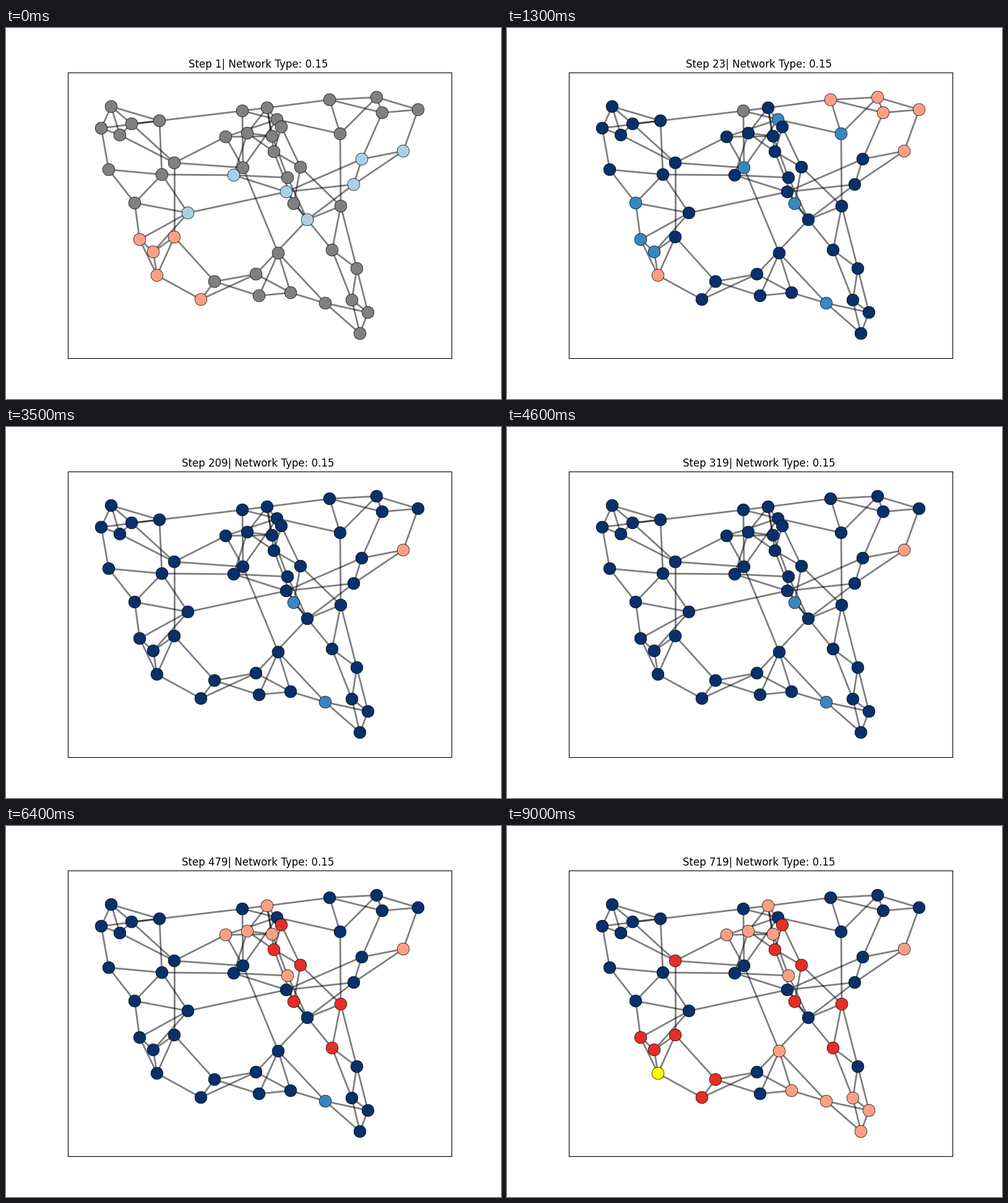
A matplotlib script for the animation above (9100 ms loop, 800 by 600 pixels).

```python
import numpy as np
import matplotlib.pyplot as plt
from matplotlib.animation import FuncAnimation
from matplotlib.collections import LineCollection

# Node positions in pixels, in ring order
NODES = np.array([
    (368, 238), (453, 265), (562, 253), (575, 212), (642, 199), (666, 132),
    (608, 137), (599, 112), (523, 116), (540, 171), (438, 148), (382, 134),
    (383, 226), (248, 150), (272, 218), (203, 155), (184, 173), (170, 127),
    (154, 162), (166, 229), (252, 237), (208, 283), (294, 299), (216, 342),
    (238, 362), (244, 400), (272, 338), (315, 439), (337, 410), (404, 398),
    (409, 433), (460, 428), (440, 364), (516, 445), (572, 494), (585, 460),
    (559, 440), (567, 389), (527, 359), (541, 288), (487, 310), (465, 284),
    (476, 225), (433, 200), (445, 160), (390, 170), (422, 129), (430, 175),
    (355, 176), (455, 242)])
N = len(NODES)

# Small-world graph: each node links to its next two, some links are rewired
REWIRED = {(12, 13): 32, (13, 14): 20, (17, 19): 13, (18, 20): 13,
           (26, 27): 14, (29, 30): 40, (39, 41): 42, (40, 42): 2,
           (46, 48): 11, (48, 49): 14, (48, 0): 12, (49, 1): 40,
           (0, 2): 20, (3, 5): 6, (8, 10): 46, (9, 11): 39}
CUT = {(44, 45), (4, 6), (32, 34)}
EXTRA = [(22, 1), (45, 0), (48, 10), (43, 46), (1, 40)]

ring = [(u, (u + k) % N) for u in range(N) for k in (1, 2)]
edges = EXTRA + [(u, REWIRED.get((u, v), v))
                 for u, v in ring if (u, v) not in CUT]

BLUES = [plt.cm.Blues(k / 3) for k in (1, 2, 3)]
SALMON, RED = plt.cm.Reds(1 / 3), plt.cm.Reds(2 / 3)

BLUE_SEEDS = [*range(5), 22, 40]
RED_SEEDS = range(23, 28)
REBELS = range(4, 9)
SLOW, SLOWEST, STUCK = {9, 10, 12, 21, 23, 24}, {11, 25}, {33, 41}

# Later outbreaks: step, colour, nodes
OUTBREAKS = [(350, SALMON, range(45, 50)),
             (450, RED, {38, 39, *range(41, 45)}),
             (500, RED, {14, *range(23, 29)}),
             (600, SALMON, range(31, 37)),
             (700, "yellow", {25})]

# Steps on show: dense start, then every tenth one plus most outbreaks
early = np.ceil(np.linspace(1, 29, 18)).astype(int)
steps = sorted({*early, *range(39, 720, 10),
                *(when for when, _, _ in OUTBREAKS[:-1])})


def hops(seeds):
    """Hop count from the seeds to every node."""
    dist = dict.fromkeys(seeds, 0)
    queue = list(seeds)
    for n in queue:
        for edge in edges:
            if n in edge:
                other = sum(edge) - n
                if other not in dist:
                    dist[other] = dist[n] + 1
                    queue.append(other)
    return dist


dist = hops(BLUE_SEEDS)


def turn_time(n):
    """Frame at which a node starts to turn blue."""
    if n in SLOWEST:
        return 14
    if n in SLOW:
        return 10
    return 2 * dist[n] + 1 if dist[n] else 0


def node_color(n, i):
    for when, color, group in reversed(OUTBREAKS):
        if steps[i] >= when and n in group:
            return color
    start = turn_time(n)
    if n in REBELS and i >= 11:
        if n == REBELS[0] or i < 14:
            return SALMON
        start = 14
    if i < start:
        return SALMON if n in RED_SEEDS else "gray"
    return BLUES[min((i - start) // 2, 1 if n in STUCK else 2)]


fig, ax = plt.subplots(figsize=(8, 6), dpi=100)
ax.set(xlim=(100, 720), ylim=(534, 72), xticks=[], yticks=[])
ax.add_collection(LineCollection([NODES[list(e)] for e in edges],
                                 colors="black", linewidths=2, alpha=0.5,
                                 zorder=1))
dots = ax.scatter(*NODES.T, s=200, c="gray", edgecolors="black",
                  linewidths=0.5, zorder=2)
title = ax.set_title("")


def update(i):
    title.set_text(f"Step {steps[i]}| Network Type: 0.15 ")
    dots.set_facecolor([node_color(n, i) for n in range(N)])
    return dots, title


anim = FuncAnimation(fig, update, frames=len(steps), interval=100,
                     repeat=True, repeat_delay=0, blit=False)
plt.show()
```
